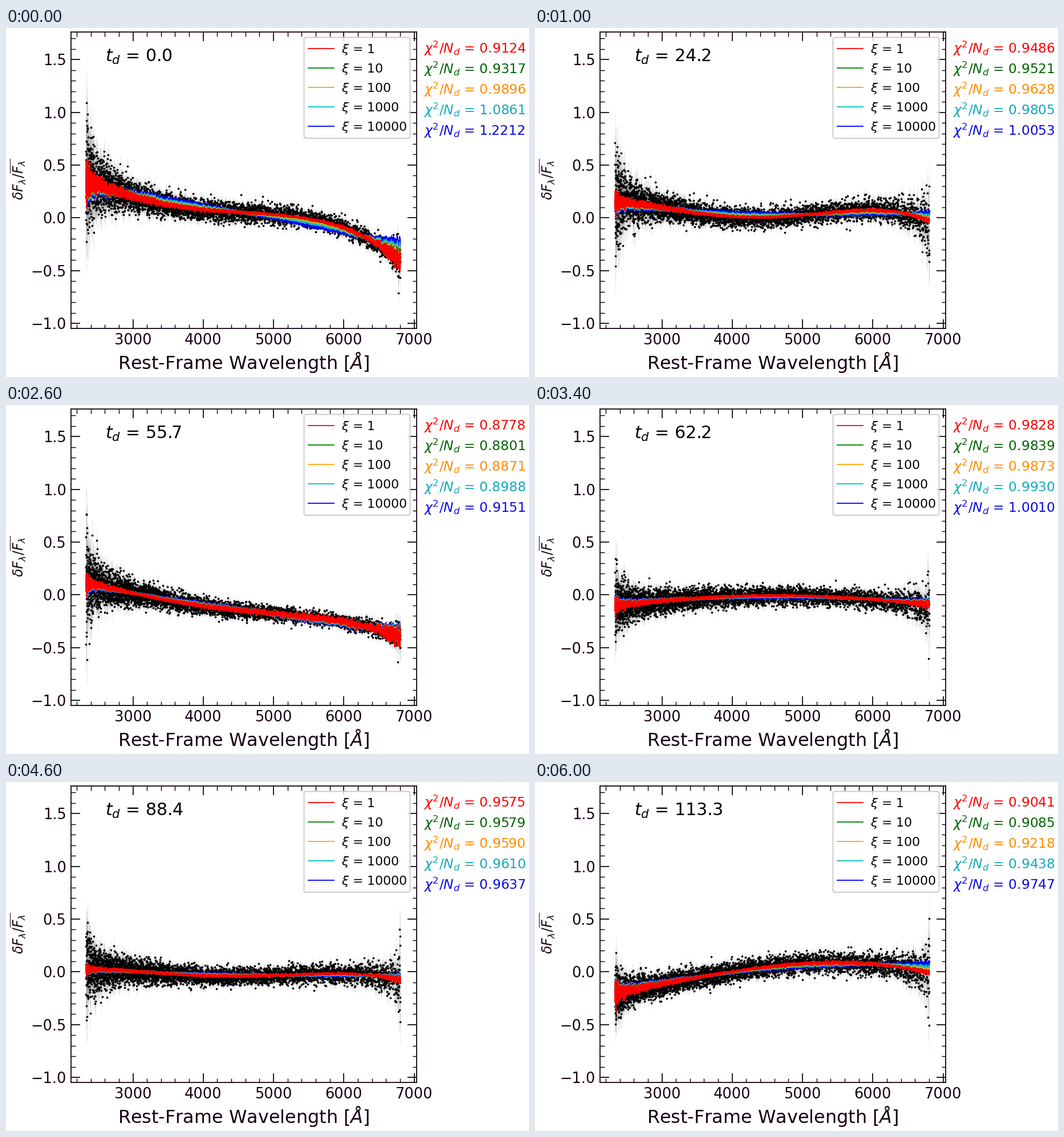
Recreate the animation shown at these times as a matplotlib script. Size 917 by 611 pixels, loop 6.2 s.

```python
import numpy as np
import matplotlib.pyplot as plt
from matplotlib.animation import FuncAnimation
from matplotlib.collections import LineCollection
from matplotlib.patches import FancyBboxPatch
from matplotlib.ticker import MultipleLocator
from numpy.polynomial import legendre

W, H, DPI = 917, 611, 64
FRAMES, STEP = 31, 200
INK = "#140012"


def px(v):
    """Pixels to points."""
    return v * 72 / DPI


plt.rcParams["font.family"] = "DejaVu Sans"
plt.rcParams["mathtext.fontset"] = "dejavusans"

LINES = ["red", "green", "orange", "c", "blue"]
LABELS = ["red", "darkgreen", "darkorange", "#14a8c0", "#0a0ae6"]

# Key epochs: step, day, chi of first and last fit, five curve levels
EPOCHS = np.array([
    [0, 0.0, 0.9124, 1.2212, 0.37, 0.13, 0.05, -0.035, -0.41],
    [5, 24.2, 0.9486, 1.0053, 0.16, 0.05, 0.008, 0.065, -0.03],
    [9, 39.3, 0.9752, 0.9981, 0.11, 0.065, 0.047, 0.035, -0.12],
    [13, 55.7, 0.8778, 0.9151, 0.12, -0.045, -0.15, -0.225, -0.40],
    [17, 62.2, 0.9828, 1.0010, -0.10, -0.035, -0.008, -0.03, -0.09],
    [23, 88.4, 0.9575, 0.9637, 0.025, -0.015, -0.04, -0.02, -0.075],
    [30, 113.3, 0.9041, 0.9747, -0.20, -0.06, 0.05, 0.085, -0.01],
])
KNOTS = np.linspace(-1, 1, 5)
# Smoothing strength per fit, and how much it damps each Legendre order
SMOOTH = np.linspace(0, 1, 5) ** 2
DAMP = np.array([0, 0, 0.5, 1, 1])

wave = np.geomspace(2332, 6805, 4650)
left, right = wave - wave[0], wave[-1] - wave
v = 2 * left / np.ptp(wave) - 1
sigma = (0.044 + 0.12 * np.exp(-left / 60) + 0.07 * np.exp(-left / 450)
         + 0.15 * np.exp(-right / 35) + 0.075 * np.exp(-right / 300))
ripple = (0.05 + 0.18 * np.exp(-left / 50) + 0.06 * np.exp(-left / 400)
          + 0.10 * np.exp(-right / 120))
ripple *= np.random.default_rng(7).normal(size=wave.size)


def epoch(i):
    """Day, chi range and curve levels at step i."""
    row = [np.interp(i, EPOCHS[:, 0], col) for col in EPOCHS.T[1:]]
    return row[0], row[1], row[2], row[3:]


fig = plt.figure(figsize=(W / DPI, H / DPI), dpi=DPI, facecolor="white")
L, R, T, B = 113.5, 719.5, 7, 526
ax = fig.add_axes([L / W, 1 - B / H, (R - L) / W, (B - T) / H])
ax.set(xlim=(3000 + (L - 222.5) / 0.12325, 3000 + (R - 222.5) / 0.12325),
       ylim=((332.3 - B) / 184.75, (332.3 - T) / 184.75))
ax.xaxis.set_major_locator(MultipleLocator(1000))
ax.xaxis.set_minor_locator(MultipleLocator(200))
ax.yaxis.set_major_locator(MultipleLocator(0.5))
ax.yaxis.set_minor_locator(MultipleLocator(0.1))
ax.tick_params(which="both", direction="in", top=True, right=True)
ax.tick_params(which="major", length=px(16), width=px(1.7), pad=px(8),
               labelsize=px(25.6), labelcolor=INK)
ax.tick_params(which="minor", length=px(7.5), width=px(1.4))
for spine in ax.spines.values():
    spine.set(linewidth=px(1.8), color=INK)

bars = LineCollection([], colors="gray", alpha=0.17, linewidths=px(1), zorder=1)
ax.add_collection(bars, autolim=False)
dots, = ax.plot([], [], "o", color="black", ms=px(3.7), mew=0, zorder=2)
models = [ax.plot([], [], color=c, lw=px(1.8), zorder=2.4 - 0.05 * k)[0]
          for k, c in enumerate(LINES)]

# Overlay in pixel coordinates
top = fig.add_axes([0, 0, 1, 1], zorder=5)
top.set(xlim=(0, W), ylim=(H, 0))
top.axis("off")


def put(x, y, s, size, color="black", **kw):
    return top.text(x, y, s, fontsize=px(size), color=color, **kw)


top.add_patch(FancyBboxPatch((526.5, 20.5), 178, 168.5,
                             boxstyle="round,pad=4,rounding_size=4",
                             fc=(1, 1, 1, 0.8), ec="0.8", lw=px(2)))
for k, c in enumerate(LINES):
    y = 36 + 34 * k
    top.plot([529.5, 574.5], [y, y], color=c, lw=px(1.8))
    put(588.5, y + 8, rf"$\xi$ = {10 ** k}", 22)

scores = [put(732.5, 43.5 + 36.2 * k, "", 23.4, c) for k, c in enumerate(LABELS)]
day_text = put(173.5, 59, "", 30)
put(416.5, 597, r"Rest-Frame Wavelength [$\mathit{Å}$]", 31.9, INK, ha="center")
put(22, 265, r"$\delta F_\lambda/\overline{F_\lambda}$", 23.5, INK,
    rotation=90, ha="center", va="center")


def draw(i):
    day, low, high, levels = epoch(i)
    coef = legendre.legfit(KNOTS, levels, 4)
    base = legendre.legval(v, coef)
    err = sigma * (1 + 1.2 * base)
    flux = base + err * np.random.default_rng(100 + i).normal(size=wave.size)
    dots.set_data(wave, flux)
    bars.set_segments(np.stack([np.column_stack([wave, flux - err]),
                                np.column_stack([wave, flux + err])], axis=1))
    for line, score, s in zip(models, scores, SMOOTH):
        mid = legendre.legval(v, coef * (1 - s * DAMP))
        line.set_data(wave, mid + ripple * (0.1 + np.abs(mid)))
        score.set_text(rf"$\chi^2/N_d$ = {low + s * (high - low):.4f}")
    day_text.set_text(rf"$t_d$ = {day:.1f}")
    return [bars, dots, *models, *scores, day_text]


anim = FuncAnimation(fig, draw, frames=FRAMES, interval=STEP,
                     repeat=True, repeat_delay=0, blit=False)
plt.show()
```
